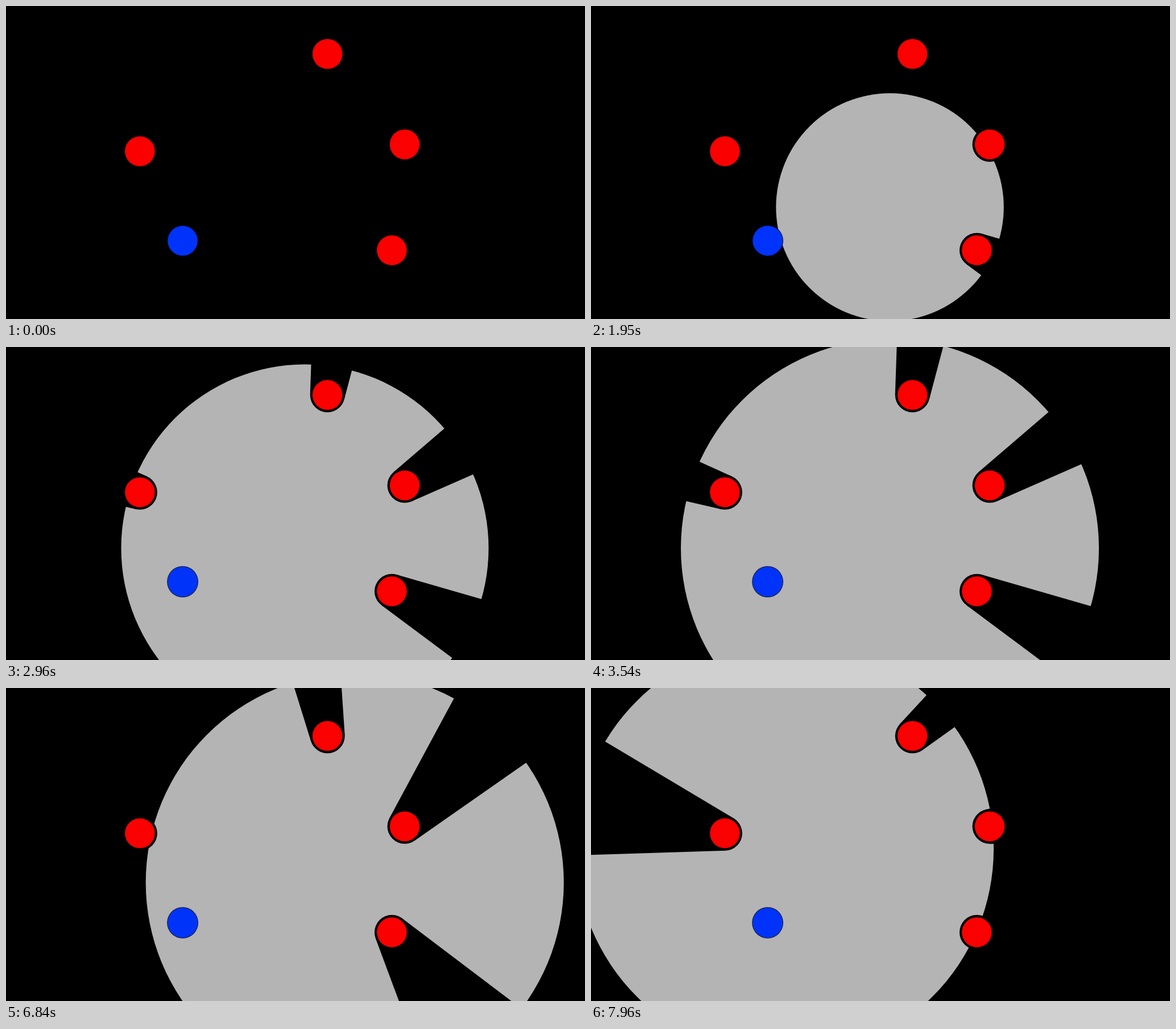
An HTML page with a canvas that plays this animation: 1018x550 px, repeating every 8 s.

```html
<!DOCTYPE html>
<html>
<head>
<meta charset="utf-8">
<style>
  html, body { margin: 0; width: 100%; height: 100%; overflow: hidden; background: #000; }
  canvas { display: block; }
</style>
</head>
<body>
<canvas width="1018" height="550"></canvas>
<script>
const ctx = document.querySelector('canvas').getContext('2d');
const LOOP = 8000, DOT_RADIUS = 26.3, BLOCK_RADIUS = 30.5;
const blockers = [[565.2, 84.3], [701, 243.2], [678.4, 429.3], [235.4, 255.3]];
const player = [310.6, 412.5];

// Bursts of evenly spaced updates: start, end, number of steps
const bursts = [
  [500, 1250, 15], [1350, 2130, 16], [2190, 2960, 16], [3010, 3370, 8],
  [3540, 3540, 1], [6400, 7180, 12], [7240, 7960, 11]
];

// Keys: time, values
const radiusKeys = [
  [500, 5], [1250, 96.5], [1450, 119], [2130, 236], [2420, 265],
  [2960, 323], [3370, 366.5], [3540, 367.5]
];
const lightKeys = [
  [3540, 525.5, 353.5], [6400, 528.5, 351.5], [6560, 556, 342], [6760, 602, 338],
  [6970, 638, 350], [7050, 642.5, 359], [7180, 626.5, 384], [7240, 597, 393],
  [7384, 540, 408], [7528, 476, 410], [7672, 418, 390], [7816, 370, 345],
  [7960, 340.5, 282.5]
];

function snapTime(t) {
  const [start, end, steps] = bursts.findLast(b => b[0] <= t);
  const stepMs = (end - start) / (steps - 1) || 1;
  return start + Math.min(steps - 1, Math.floor((t - start) / stepMs + 1e-6)) * stepMs;
}

function valuesAt(keys, t) {
  const next = keys.findIndex(k => k[0] > t);
  if (next === 0) return keys[0].slice(1);
  if (next < 0) return keys.at(-1).slice(1);
  const a = keys[next - 1], b = keys[next];
  const u = (t - a[0]) / (b[0] - a[0]);
  return a.slice(1).map((v, i) => v + (b[i + 1] - v) * u);
}

function disc([x, y], radius, color) {
  ctx.fillStyle = color;
  ctx.beginPath();
  ctx.arc(x, y, radius, 0, Math.PI * 2);
  ctx.fill();
}

// Blocked area: the disc itself plus everything behind it, between the two tangents
function shadow([lx, ly], [x, y]) {
  const distance = Math.hypot(x - lx, y - ly);
  const angle = Math.atan2(y - ly, x - lx);
  const spread = Math.asin(BLOCK_RADIUS / distance);
  const near = Math.sqrt(distance ** 2 - BLOCK_RADIUS ** 2);
  const lineTo = (a, d) => ctx.lineTo(lx + Math.cos(a) * d, ly + Math.sin(a) * d);
  disc([x, y], BLOCK_RADIUS, '#000');
  ctx.beginPath();
  lineTo(angle - spread, near);
  lineTo(angle - spread, 2000);
  lineTo(angle + spread, 2000);
  lineTo(angle + spread, near);
  ctx.fill();
}

function draw(t) {
  ctx.fillStyle = '#000';
  ctx.fillRect(0, 0, 1018, 550);
  if (t >= bursts[0][0]) {
    const time = snapTime(t);
    const light = valuesAt(lightKeys, time);
    disc(light, valuesAt(radiusKeys, time)[0], '#b4b4b4');
    blockers.forEach(b => shadow(light, b));
  }
  blockers.forEach(b => disc(b, DOT_RADIUS, '#fa0000'));
  disc(player, 27.5, t < bursts[0][0] ? '#000' : 'rgba(0, 8, 40, 0.85)');
  disc(player, DOT_RADIUS, '#0033fa');
}

const began = performance.now();
function frame() {
  draw((performance.now() - began) % LOOP);
  requestAnimationFrame(frame);
}
frame();
</script>
</body>
</html>
```
